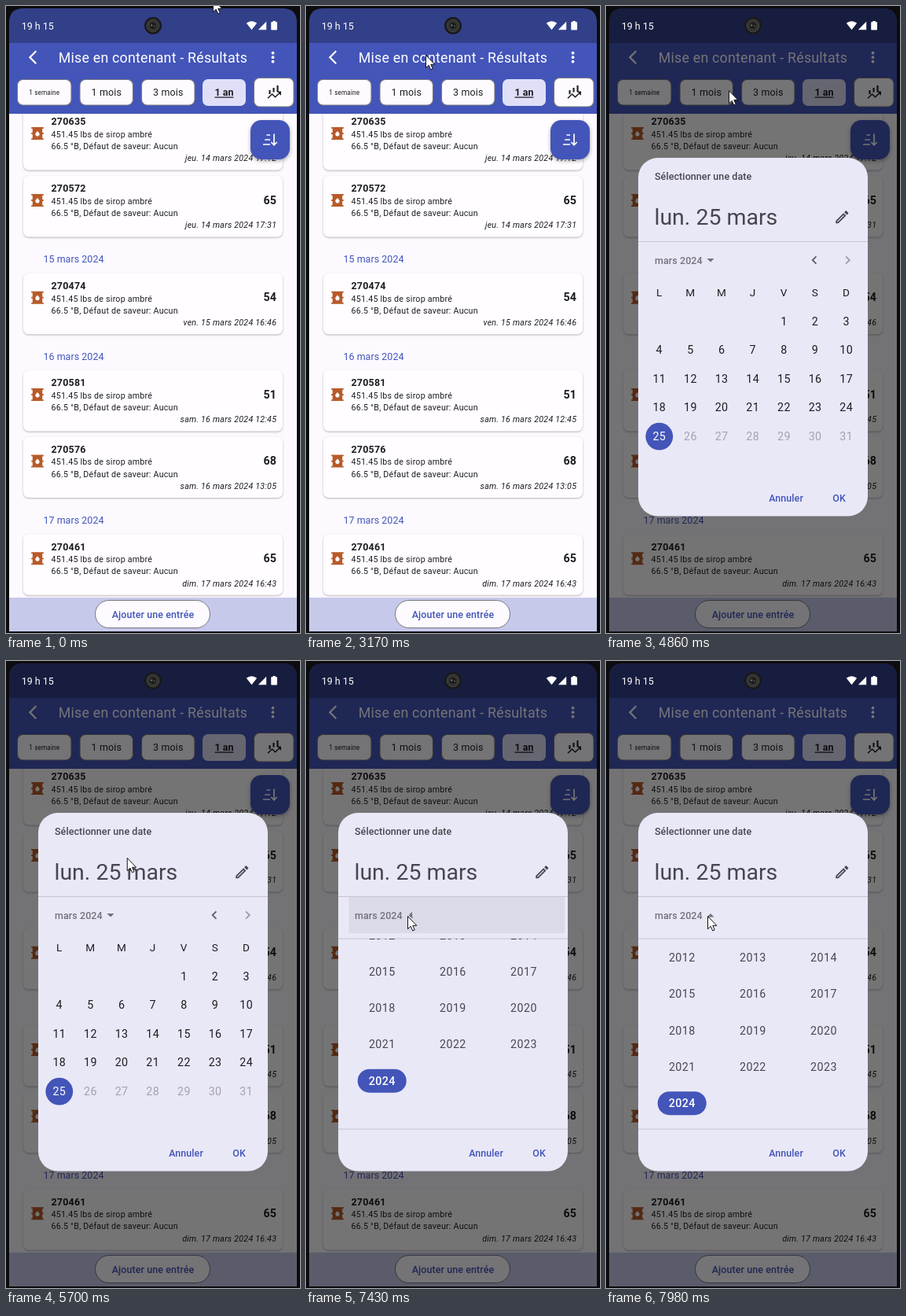
An HTML page that plays this animation: 374 by 797 pixels, repeating every 8000 ms.

```html
<!DOCTYPE html>
<html lang="fr">
<head>
<meta charset="utf-8">
<title>Mise en contenant</title>
<style>
  html, body { margin: 0; width: 100%; height: 100%; overflow: hidden; background: #0c0c0e; }
  svg { display: block; width: 100%; height: 100%; font-family: Roboto, "Noto Sans", sans-serif; }
  text { white-space: pre; }
  .card { filter: drop-shadow(0 1px 0.8px rgba(0, 0, 0, .28)); }
  .fab { filter: drop-shadow(0 2.5px 2.5px rgba(0, 0, 0, .32)); }
</style>
</head>
<body>
<svg id="stage" viewBox="0 0 374 797" xmlns="http://www.w3.org/2000/svg"></svg>
<script>
const LOOP = 8000;
const BLUE = '#4355b9', INK = '#1d1c21', SOFT = '#47464f';
const DP = 0.89; // pixels per layout unit

// Text placed by the middle of its capitals.
function label(x, mid, str, size, { fill = INK, weight = 400, anchor = 'start', gap = 0.1, extra = '' } = {}) {
  return `<text x="${x}" y="${(mid + size * 0.356).toFixed(2)}" font-size="${size}" fill="${fill}" font-weight="${weight}" text-anchor="${anchor}" letter-spacing="${gap}" ${extra}>${str}</text>`;
}
const rect = (x, y, w, h, r, fill, extra = '') =>
  `<rect x="${x}" y="${y}" width="${w}" height="${h}" rx="${r}" fill="${fill}" ${extra}/>`;
const icon = (cx, cy, d, fill) =>
  `<path transform="translate(${cx - 12 * DP} ${cy - 12 * DP}) scale(${DP})" d="${d}" fill="${fill}"/>`;
const stroke = (d, color, width) =>
  `<path d="${d}" fill="none" stroke="${color}" stroke-width="${width}"/>`;
const rule = y => rect(41, y, 292, 1, 0, '#c6c5d0');

const BARREL = 'M20 13c.55 0 1-.45 1-1s-.45-1-1-1h-1V5h1c.55 0 1-.45 1-1s-.45-1-1-1H4c-.55 0-1 .45-1 1s.45 1 1 1h1v6H4c-.55 0-1 .45-1 1s.45 1 1 1h1v6H4c-.55 0-1 .45-1 1s.45 1 1 1h16c.55 0 1-.45 1-1s-.45-1-1-1h-1v-6h1zm-8 3c-1.66 0-3-1.32-3-2.95 0-1.3.52-1.67 3-4.55 2.47 2.86 3 3.24 3 4.55 0 1.63-1.34 2.95-3 2.95z';
const PENCIL = 'M14.06 9.02l.92.92L5.92 19H5v-.92l9.06-9.06M17.66 3c-.25 0-.51.1-.7.29l-1.83 1.83 3.75 3.75 1.83-1.83c.39-.39.39-1.02 0-1.41l-2.34-2.34c-.2-.2-.45-.29-.71-.29zm-3.6 3.19L3 17.25V21h3.75L17.81 9.94l-3.75-3.75z';
const PREV = 'M15.41 7.41L14 6l-6 6 6 6 1.41-1.41L10.83 12z';
const NEXT = 'M8.59 16.59L13.17 12 8.59 7.41 10 6l6 6-6 6z';

function entry(y, id, count, date) {
  return rect(22, y - 16, 330, 77.5, 7, '#fffdff', 'class="card"') +
    icon(40, y + 15, BARREL, '#b85a28') +
    label(57.5, y, id, 12.46, { weight: 700, gap: 0.2 }) +
    label(57.5, y + 16, '451.45 lbs de sirop ambré', 10.68, { gap: 0.22 }) +
    label(57.5, y + 31.3, '66.5 °B, Défaut de saveur: Aucun', 10.68, { gap: 0.22 }) +
    label(344.2, y + 14.7, count, 14.24, { weight: 700, anchor: 'end', gap: 0.2 }) +
    label(344.2, y + 46.5, date, 10.68, { anchor: 'end', gap: 0.22, extra: 'font-style="italic"' });
}

function list() {
  const day = (y, str) => label(47.4, y, str, 12.46, { fill: BLUE, gap: 0.05 });
  return rect(4, 137, 366, 616, 0, '#fcf9ff') +
    entry(147, '270635', '', 'jeu. 14 mars 2024 17:12') +
    entry(232, '270572', '65', 'jeu. 14 mars 2024 17:31') +
    day(321.5, '15 mars 2024') +
    entry(355.7, '270474', '54', 'ven. 15 mars 2024 16:46') +
    day(445.3, '16 mars 2024') +
    entry(479, '270581', '51', 'sam. 16 mars 2024 12:45') +
    entry(563.6, '270576', '68', 'sam. 16 mars 2024 13:05') +
    day(653.3, '17 mars 2024') +
    entry(687.3, '270461', '65', 'dim. 17 mars 2024 16:43');
}

function chip(x, w, str, size) {
  return rect(x + .5, 93.5, w, 32.5, 7, '#fdfbff', 'stroke="#77767f" stroke-width="1.1"') +
    label(x + w / 2 + .5, 110, str, size, { anchor: 'middle', gap: 0.15 });
}

function header() {
  const dots = [59.7, 65.2, 70.7].map(y => `<circle cx="339.5" cy="${y}" r="1.9" fill="#fff"/>`).join('');
  return rect(4, 3, 366, 45, 0, '#324089') + rect(4, 47, 366, 90, 0, BLUE) +
    stroke('M38.3 57.2L30.4 65.2L38.3 73.2', '#fff', 2.2) +
    label(187, 65.3, 'Mise en contenant - Résultats', 17.8, { fill: '#fff', anchor: 'middle', gap: 0.22 }) + dots +
    chip(14, 68.5, '1 semaine', 8.2) + chip(93.5, 67.5, '1 mois', 12.46) + chip(172, 67.5, '3 mois', 12.46) +
    rect(250, 93, 55, 34, 7, '#dfe0f7') +
    label(277.5, 110, '1 an', 12.46, { weight: 700, anchor: 'middle', gap: 0, extra: 'text-decoration="underline"' }) +
    rect(315.5, 91.5, 50.5, 36.5, 7, '#fdfbff', 'stroke="#77767f" stroke-width="1.1"') +
    stroke('M335.5 107V112M340.5 104V109.5M345.5 101V109', INK, 2.1) +
    stroke('M333 117.3L338.5 112L342.5 115.8L349 109.5M345.3 109.3H349.2V113.2', INK, 1.5);
}

function footer() {
  return rect(4, 752, 366, 43, 0, '#c6c9ea') +
    rect(113.5, 755.5, 146, 35, 17.5, '#fdfbff', 'stroke="#777680" stroke-width="1"') +
    label(187, 773.2, 'Ajouter une entrée', 12.46, { fill: BLUE, weight: 500, anchor: 'middle' });
}

function fab() {
  return rect(311, 145, 50, 50, 14, BLUE, 'class="fab"') +
    stroke('M331.5 164H336M329.3 170H336M327 176H336M341 162.5V176.5M337.3 173L341 176.8L344.7 173', '#fff', 1.7);
}

function statusBar() {
  return label(19.7, 25.8, '19 h 15', 12.46, { fill: '#fff', gap: 0 }) +
    '<path d="M305.8 21.8Q312.5 16.8 319.2 21.8L312.5 30.3Z" fill="#fff"/>' +
    '<path d="M331.2 19.8V30.3H320.8Z" fill="#fff"/>' +
    '<path d="M339.5 20.2V19H342.7V20.2H344.2Q345 20.2 345 21V29.7Q345 30.5 344.2 30.5H338Q337.2 30.5 337.2 29.7V21Q337.2 20.2 338 20.2Z" fill="#fff"/>' +
    '<circle cx="187" cy="25" r="11" fill="#19191a"/>' +
    '<circle cx="187" cy="25" r="8" fill="#343432" stroke="#48484a" stroke-width=".8"/>' +
    '<circle cx="187" cy="25" r="4.2" fill="#1c1c1c"/>' +
    '<circle cx="185.3" cy="24.5" r="1" fill="#8d8d85"/><circle cx="189" cy="25.5" r=".8" fill="#77776f"/>';
}

function monthView() {
  const colX = i => 67.8 + i * 39.65;
  const opt = { anchor: 'middle', gap: 0.4 };
  let out = [...'LMMJVSD'].map((c, i) => label(colX(i), 364, c, 13.6, opt)).join('');
  out += `<circle cx="67.8" cy="547.2" r="17.4" fill="${BLUE}"/>`;
  for (let d = 1; d <= 31; d++) {
    const cell = d + 3;
    const fill = d < 25 ? INK : d === 25 ? '#fff' : '#a3a2ac';
    out += label(colX(cell % 7), 400.6 + Math.floor(cell / 7) * 36.6, d, 14.24, { ...opt, fill });
  }
  return out + icon(265, 323, PREV, '#5a5963') + icon(307.5, 323, NEXT, '#9c9ba5');
}

function yearView() {
  let out = '';
  for (let y = 2009; y <= 2024; y++) {
    const i = y - 2009, x = 96.8 + (i % 3) * 90.1, mid = 562.2 - (5 - Math.floor(i / 3)) * 46.3;
    const on = y === 2024;
    if (on) out += rect(65.7, mid - 15, 62, 30, 15, BLUE);
    out += label(x, mid, y, 14.24, { anchor: 'middle', gap: 0.44, fill: on ? '#fff' : SOFT, weight: on ? 500 : 400 });
  }
  return rule(352.5) + `<g clip-path="url(#yearClip)"><g id="years">${out}</g></g>` + rule(594.5);
}

function dialog() {
  const action = (x, str) => label(x, 625.5, str, 12.46, { fill: BLUE, weight: 500, anchor: 'middle' });
  return rect(41, 193, 292, 455.5, 25, '#e9e8f7') +
    `<g clip-path="url(#toggleClip)"><circle id="splash" fill="#000" fill-opacity=".06"/></g>` +
    rect(54.5, 300, 274.5, 46, 0, '#000', 'id="glow"') +
    label(62, 216.5, 'Sélectionner une date', 12.46, { fill: SOFT, weight: 500 }) +
    label(61.5, 267.8, 'lun. 25 mars', 28.48, { fill: SOFT, gap: 0 }) +
    icon(300.3, 268.3, PENCIL, SOFT) + rule(299) +
    label(62, 323.2, 'mars 2024', 12.46, { fill: '#72717b', weight: 500 }) +
    '<path id="arrow" d="M-4.5 -2.2H4.5L0 2.3Z" fill="#72717b"/>' +
    `<g id="month">${monthView()}</g><g id="yearPane">${yearView()}</g>` +
    action(229, 'Annuler') + action(296.7, 'OK');
}

document.getElementById('stage').innerHTML = `
  <defs>
    <clipPath id="screen"><path d="M4 795V21Q4 3 22 3H352Q370 3 370 21V795Z"/></clipPath>
    <clipPath id="yearClip"><rect x="41" y="353" width="292" height="242"/></clipPath>
    <clipPath id="toggleClip"><rect x="54.5" y="300" width="274.5" height="46"/></clipPath>
  </defs>
  <rect width="374" height="797" fill="#0c0c0e"/>
  <g clip-path="url(#screen)">
    ${list()}${header()}${footer()}${fab()}
    <rect id="scrim" x="4" y="3" width="366" height="792"/>
    ${statusBar()}
    <g id="dialog">${dialog()}</g>
  </g>
  <path id="cursor" d="M.5 .5V16.7L4.2 13.2L6.7 18.9L9.2 17.8L6.8 12.3H11.8Z" fill="#fff" stroke="#111" stroke-width="1" stroke-linejoin="round"/>`;

const $ = Object.fromEntries(['scrim', 'dialog', 'splash', 'glow', 'arrow', 'month', 'yearPane', 'years', 'cursor']
  .map(id => [id, document.getElementById(id)]));
const set = (el, attrs) => Object.entries(attrs).forEach(([k, v]) => el.setAttribute(k, v));
const show = (el, on) => set(el, { visibility: on ? 'visible' : 'hidden' });
const clamp = v => Math.min(1, Math.max(0, v));
const span = (t, a, b) => clamp((t - a) / (b - a));
const mix = (a, b, u) => a + (b - a) * u;

// Pointer stops: time, x, y.
const PATH = [
  [0, 263, -9], [470, 263, -9], [1270, 130, 55], [1370, 130, 55], [1540, 121, 59.5], [1780, 121, 59.5],
  [2500, 152, 62], [4420, 152, 62], [4860, 156, 107], [5180, 160, 168], [5280, 160, 168],
  [6020, 149, 312], [6120, 149, 312], [6640, 129, 324], [LOOP, 129, 324]
];
function pointer(t) {
  const i = Math.max(1, PATH.findIndex(p => p[0] > t));
  const [a, b] = [PATH[i - 1], PATH[i]];
  const u = span(t, a[0], b[0]);
  return [mix(a[1], b[1], u), mix(a[2], b[2], u)];
}

const OPEN = 3490, PRESS = 6910, SWITCH = 7320, SETTLE = 7337;

function draw(t) {
  const rest = (1 - span(t, OPEN, OPEN + 150)) ** 2;
  const open = t >= OPEN, years = t >= SWITCH;
  set($.scrim, { 'fill-opacity': open ? 0.54 - 0.14 * rest : 0 });
  set($.dialog, { opacity: open ? 1 - 0.35 * rest : 0 });
  show($.month, !years);
  show($.yearPane, years);

  const press = span(t, PRESS - 60, PRESS + 170);
  set($.splash, { cx: mix(130, 138.5, press), cy: 324, r: t >= PRESS && !years ? 53 * press : 0 });
  set($.glow, { 'fill-opacity': years ? 0.06 * (1 - span(t, 7450, 7700)) : 0 });
  set($.arrow, { transform: `translate(133 323.3) rotate(${180 * span(t, SETTLE, SETTLE + 200)})` });

  // Critically damped spring back from one row of overscroll.
  const k = 14.14 * Math.max(0, t - SETTLE) / 1000;
  set($.years, { transform: `translate(0 ${-46.3 * (1 + k) * Math.exp(-k)})` });

  const [x, y] = pointer(t);
  set($.cursor, { transform: `translate(${x} ${y})` });
}

const start = performance.now();
function tick() {
  draw((performance.now() - start) % LOOP);
  requestAnimationFrame(tick);
}
tick();
</script>
</body>
</html>
```
